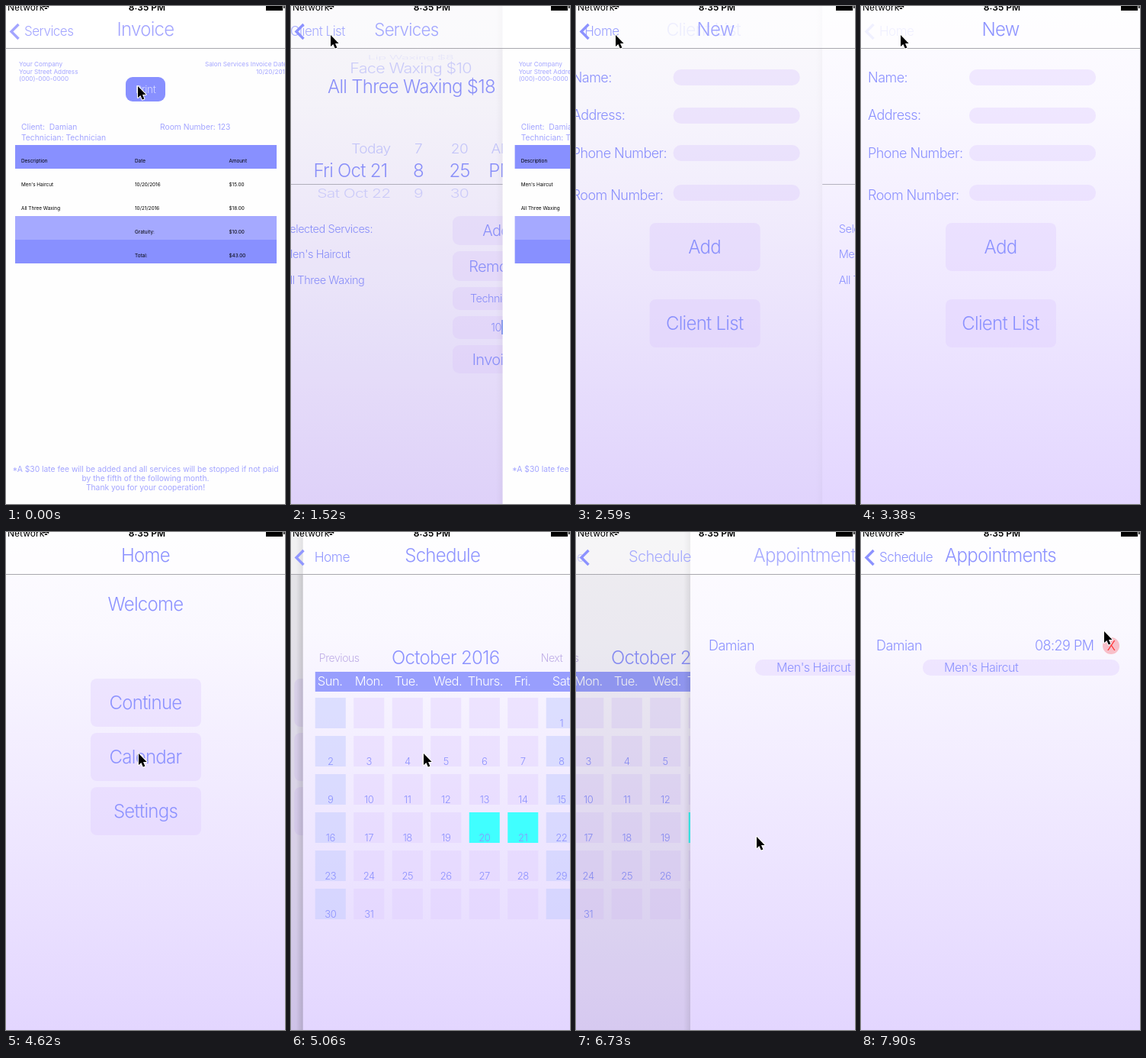
Recreate the animation shown at these times as an HTML page with a canvas. Size 366 by 652 pixels, loop 8 s.

```html
<!DOCTYPE html>
<html lang="en">
<head>
<meta charset="utf-8">
<title>Salon app walkthrough</title>
<style>
html, body { margin: 0; width: 100%; height: 100%; overflow: hidden; background: #fff; }
canvas { display: block; width: 100vw; height: 100vh; }
</style>
</head>
<body>
<canvas id="stage" width="366" height="652"></canvas>
<script>
const ctx = document.getElementById('stage').getContext('2d');
const LOOP = 8000, STEP = 88.5, PHASE = 2;
// The phone is a little wider than the stage and cropped on both sides.
const W = 366, H = 652, VIEW_LEFT = -4, VIEW_WIDTH = 375, MID = 183;
const INK = '#8c92ff', PALE = '#a3a5ff', BLOCK = '#8890ff', SOFT = 'rgba(221,203,255,.38)';
const CLIENT = 'Damian';

const clamp = v => Math.max(0, Math.min(1, v));
const lerp = (a, b, u) => a + (b - a) * u;

function setFont(size, weight = 300) {
  ctx.font = `${weight} ${size}px Inter, "Open Sans", sans-serif`;
  ctx.letterSpacing = (size > 12 ? -0.03 * size : 0) + 'px';
}
function text(str, x, y, size, { align = 'left', color = INK, alpha = 1, weight = 300, squash = 1 } = {}) {
  ctx.save();
  setFont(size, weight);
  ctx.textAlign = align;
  ctx.fillStyle = color;
  ctx.globalAlpha *= alpha;
  ctx.translate(x, y);
  ctx.scale(1, squash);
  ctx.fillText(str, 0, 0);
  ctx.restore();
}
const centered = (str, x, y, size, options) => text(str, x, y, size, { align: 'center', ...options });
function rect(x, y, w, h, color) {
  ctx.fillStyle = color;
  ctx.fillRect(x, y, w, h);
}
function rounded(x, y, w, h, r, color = SOFT) {
  ctx.fillStyle = color;
  ctx.beginPath();
  ctx.roundRect(x, y, w, h, r);
  ctx.fill();
}
function bigButton(label, y) {
  rounded(111, y, 145, 63, 8);
  centered(label, MID, y + 40, 24);
}
function lavender() {
  const g = ctx.createLinearGradient(0, 0, 0, H);
  g.addColorStop(0, '#fdfcff');
  g.addColorStop(.2, '#faf8ff');
  g.addColorStop(1, '#e3d6ff');
  rect(VIEW_LEFT, 0, VIEW_WIDTH, H, g);
}

const invoice = {
  title: 'Invoice', back: 'Services', ink: PALE,
  draw() {
    rect(VIEW_LEFT, 0, VIEW_WIDTH, H, '#fefefe');
    const pale = { color: PALE, weight: 400 };
    ['Your Company', 'Your Street Address', '(000)-000-0000']
      .forEach((s, i) => text(s, 17, 79 + i * 9.5, 8.2, pale));
    ['Salon Services Invoice Date:', '10/20/2016']
      .forEach((s, i) => text(s, 371, 79 + i * 9.5, 8.2, { ...pale, align: 'right' }));
    rounded(157, 93, 52, 32, 9, BLOCK);
    centered('Print', MID, 114, 13.5, { color: '#d6d8ff' });
    text('Client:  ' + CLIENT, 20, 162, 10.3, pale);
    text('Room Number: 123', 202, 162, 10.3, pale);
    text('Technician: Technician', 20, 176, 10.3, pale);
    rect(12, 182, 343, 31, BLOCK);
    rect(12, 275, 343, 31, '#a5a9ff');
    rect(12, 306, 343, 31, BLOCK);
    [['Description', 'Date', 'Amount'],
     ["Men's Haircut", '10/20/2016', '$15.00'],
     ['All Three Waxing', '10/21/2016', '$18.00'],
     ['', 'Gratuity:', '$10.00'],
     ['', 'Total:', '$43.00']].forEach((row, r) => row.forEach((s, c) =>
      text(s, [20, 169, 292.5][c], 205 + r * 31, 6.4, { color: '#000', weight: 400 })));
    ['*A $30 late fee will be added and all services will be stopped if not paid',
     'by the fifth of the following month.', 'Thank you for your cooperation!']
      .forEach((s, i) => centered(s, MID, 610 + i * 12, 10.3, pale));
  }
};

const services = {
  title: 'Services', back: 'Client List',
  draw() {
    lavender();
    centered('Lip Waxing $8', 185, 70, 18, { alpha: .15, squash: .4 });
    centered('Face Waxing $10', 185, 88, 21.5, { alpha: .4, squash: .85 });
    centered('All Three Waxing $18', 186, 114, 24);
    [['Today', '7', '20', 'AM', 193, 19, .45, .88],
     ['Fri Oct 21', '8', '25', 'PM', 224, 24, 1, 1],
     ['Sat Oct 22', '9', '30', '', 251, 21, .35, .75]]
      .forEach(([day, hour, minute, half, y, size, alpha, squash]) => {
        const look = { alpha, squash };
        text(day, alpha < 1 ? 158.5 : 154.5, y, size, { ...look, align: 'right' });
        [hour, minute, half].forEach((s, i) => centered(s, [195, 249, 305][i], y, size, look));
      });
    rect(VIEW_LEFT, 233, VIEW_WIDTH, 1, '#b4b2bf');
    ['Selected Services:', "Men's Haircut", 'All Three Waxing']
      .forEach((s, i) => text(s, 17.5, 297 + i * 33.4, 14.5));
    [['Add', 275, 38, 20], ['Remove', 321, 39, 20], ['Technician', 368, 30, 14.4],
     ['10', 406, 30, 14.4], ['Invoice', 444, 37, 20]].forEach(([s, y, h, size]) => {
      rounded(240, y, 115, h, 9);
      centered(s, 297, y + h / 2 + size * .37, size);
    });
    rect(304.5, 411, 2, 19, '#4169ee');
  }
};

const newClient = {
  title: 'New', back: 'Home',
  draw() {
    lavender();
    [['Name:', 100, 83], ['Address:', 149, 133], ['Phone Number:', 199, 182], ['Room Number:', 254, 234]]
      .forEach(([label, y, top]) => {
        text(label, 9, y, 18);
        rounded(142, top, 166, 21, 10);
      });
    bigButton('Add', 284);
    bigButton('Client List', 384);
  }
};

const home = {
  title: 'Home',
  draw() {
    lavender();
    centered('Welcome', MID, 103, 24);
    ['Continue', 'Calendar', 'Settings'].forEach((s, i) => bigButton(s, 192 + i * 71));
  }
};

const schedule = {
  title: 'Schedule', back: 'Home',
  draw() {
    lavender();
    text('Previous', 17, 169.5, 14, { color: '#bfaee6' });
    text('Next', 308, 169.5, 14, { color: '#bfaee6' });
    centered('October 2016', MID, 173, 24);
    rect(12, 183, 343, 26, '#989efd');
    ['Sun.', 'Mon.', 'Tue.', 'Wed.', 'Thurs.', 'Fri.', 'Sat.'].forEach((s, i) =>
      text(s, [15, 64, 116, 167, 212, 273, 323][i], 201, 16.5, { color: '#fff' }));
    for (let i = 0; i < 42; i++) {
      const col = i % 7, day = i - 5;
      const x = 12 + col * 50.5, y = 217 + Math.floor(i / 7) * 50;
      const busy = day === 20 || day === 21, weekend = col % 6 === 0;
      rect(x, y, 40, 40, busy ? '#40ffff' : weekend ? 'rgba(195,203,255,.5)' : SOFT);
      if (day > 0 && day < 32) centered(day, x + 20, y + 38, 13);
    }
  }
};

const appointments = {
  title: 'Appointments', back: 'Schedule',
  draw() {
    lavender();
    text(CLIENT, 20, 155, 18);
    text('08:29 PM', 228, 155, 18);
    rounded(317, 138, 22, 22, 11, '#f8bfc9');
    centered('X', 328, 155, 17, { color: '#ff2a2a' });
    rounded(81, 167, 258, 21, 10);
    text("Men's Haircut", 109, 183, 16);
  }
};

// Each scene: begin, page below, page on top, start of slide, direction (1 covers, -1 reveals).
const SCENES = [
  [0, services, invoice, 1305, -1],
  [2150, newClient, services, 2270, -1],
  [3625, home, schedule, 4620, 1],
  [6000, schedule, appointments, 6599, 1]
];
// Back button presses: begin, fully dimmed, release.
const PRESSES = [[1860, 2037, 2270], [3100, 3365, 3625]];
const POINTER = [
  [1030, 173, 105], [1240, 52, 38], [3560, 52, 38], [4430, 174, 290], [5610, 174, 290],
  [5754, 167, 276], [5890, 171, 260], [6160, 263, 325], [6450, 237, 399], [6740, 237, 399],
  [7060, 195, 300], [7350, 181, 217], [7878, 319, 130]
];

function slideProgress(t, start, direction) {
  let done = t < start ? 0 : 1 - Math.exp(-6.9 * (t - start) / 1000);
  if (done > .995) done = 1;
  return direction > 0 ? done : 1 - done;
}

function drawPages(below, above, p) {
  const offset = VIEW_WIDTH * (1 - p), edge = VIEW_LEFT + offset;
  if (p < 1) {
    ctx.save();
    ctx.translate(-.3 * VIEW_WIDTH * p, 0);
    below.draw();
    ctx.restore();
    rect(0, 0, W, H, `rgba(0,0,0,${.1 * p})`);
  }
  if (p > 0) {
    if (p < 1) {
      const shadow = ctx.createLinearGradient(edge - 9, 0, edge, 0);
      shadow.addColorStop(0, 'rgba(0,0,0,0)');
      shadow.addColorStop(1, `rgba(0,0,0,${.14 * p})`);
      rect(edge - 9, 0, 9, H, shadow);
    }
    ctx.save();
    ctx.translate(offset, 0);
    above.draw();
    ctx.restore();
  }
}

function drawNavigation(below, above, p, backAlpha) {
  rect(0, 0, W, 55, 'rgba(255,255,255,.45)');
  rect(0, 55, W, 1, '#a9a8ae');
  const aboveInk = above.ink || INK;
  const chevronAlpha = (below.back ? 1 : p) * backAlpha;
  ctx.save();
  ctx.globalAlpha = chevronAlpha;
  ctx.strokeStyle = p === 1 ? aboveInk : INK;
  ctx.lineWidth = 3.4;
  ctx.beginPath();
  ctx.moveTo(16.5, 24);
  ctx.lineTo(7, 33.5);
  ctx.lineTo(16.5, 43);
  ctx.stroke();
  ctx.restore();

  // The title of the page below shrinks into the back label of the page on top.
  const sameLabel = above.back === below.title;
  setFont(24);
  const titleLeft = MID - ctx.measureText(above.back).width / 2;
  const labelAlpha = (sameLabel ? 1 - p * (1 - p) : p) * (p > .5 ? backAlpha : 1);
  text(above.back, lerp(titleLeft, 24, p), 39, lerp(24, 17, p),
    { alpha: labelAlpha, color: p === 1 ? aboveInk : INK });
  if (!sameLabel) centered(below.title, MID, 39, 24, { alpha: 1 - p });
  if (below.back) text(below.back, 24 - 100 * p, 39, 17, { alpha: (1 - p) * backAlpha });
  centered(above.title, MID + 298 * (1 - p), 39, 24, { alpha: Math.sqrt(p), color: aboveInk });
}

function drawStatusBar() {
  const black = { color: '#000', weight: 400 };
  text('Network', 2, 5.5, 12, black);
  centered('8:35 PM', 185, 5.5, 12, { ...black, weight: 600 });
  ctx.strokeStyle = '#000';
  ctx.lineWidth = 1.6;
  for (const r of [2, 5]) {
    ctx.beginPath();
    ctx.arc(52.5, 5, r, -Math.PI * .76, -Math.PI * .24);
    ctx.stroke();
  }
  rect(341, 0, 22, 6, '#000');
  rect(364, 0, 1.5, 3, '#000');
}

function drawPointer(t) {
  let i = POINTER.findIndex(k => k[0] > t);
  if (i < 0) i = POINTER.length;
  const a = POINTER[Math.max(0, i - 1)], b = POINTER[Math.min(i, POINTER.length - 1)];
  const u = b === a ? 0 : clamp((t - a[0]) / (b[0] - a[0]));
  ctx.save();
  ctx.translate(lerp(a[1], b[1], u), lerp(a[2], b[2], u));
  const arrow = new Path2D('M0 0V15L3.4 11.9L5.8 17.6L8.4 16.5L6 11H10.6Z');
  ctx.lineJoin = 'round';
  ctx.lineWidth = 2;
  ctx.strokeStyle = '#fff';
  ctx.stroke(arrow);
  ctx.fillStyle = '#000';
  ctx.fill(arrow);
  ctx.restore();
}

function render(now) {
  const time = now % LOOP;
  const t = Math.max(0, PHASE + STEP * Math.floor((time - PHASE) / STEP));
  const [, below, above, start, direction] = SCENES.filter(s => s[0] <= t).pop();
  const p = slideProgress(t, start, direction);
  const press = PRESSES.find(([from, , to]) => t >= from && t < to);
  const backAlpha = press ? lerp(1, .12, clamp((t - press[0]) / (press[1] - press[0]))) : 1;
  ctx.clearRect(0, 0, W, H);
  drawPages(below, above, p);
  drawNavigation(below, above, p, backAlpha);
  drawStatusBar();
  drawPointer(t);
  requestAnimationFrame(render);
}
requestAnimationFrame(render);
</script>
</body>
</html>
```
